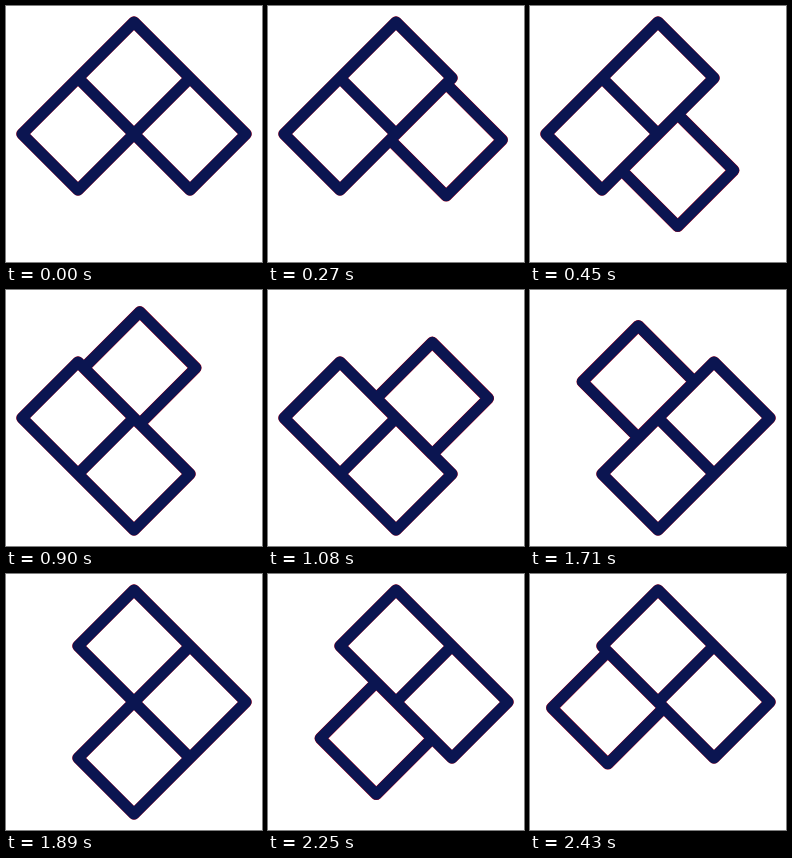
An HTML page that plays this animation: 256x256 px, repeating every 2520 ms.

```html
<!DOCTYPE html>
<html lang="en">
<head>
<meta charset="utf-8">
<title>Sliding squares</title>
<style>
  html, body { margin: 0; width: 100%; height: 100%; overflow: hidden; background: #fff; }
  svg { display: block; width: 100%; height: 100%; }
  path { fill: none; stroke-linejoin: round; }
  .rim { stroke: #c00018; stroke-width: 11.6; }
  .line { stroke: #0b1551; stroke-width: 11; }
</style>
</head>
<body>
<svg viewBox="0 0 256 256">
  <path class="rim"/>
  <path class="line"/>
</svg>
<script>
const STEP = 90, STEPS = 7, HOLD = 2, R = 56;
// Slot centres, clockwise from the top
const slots = [[128, 72], [184, 128], [128, 184], [72, 128]];
const paths = document.querySelectorAll('path');

const mod4 = n => (n + 4) % 4;
const ease = p => p * p * (3 - 2 * p);
const diamond = ([x, y]) => `M${x} ${y - R}l${R} ${R}l${-R} ${R}l${-R} ${-R}z`;

function draw(time) {
  const step = Math.floor(time / STEP) % (4 * STEPS);
  const turn = Math.floor(step / STEPS);
  const p = ease(Math.max(0, step % STEPS - HOLD) / (STEPS - HOLD));
  const from = mod4(1 - turn), to = mod4(2 - turn);
  const centres = slots.filter((_, i) => i !== from && i !== to);
  centres.push(slots[from].map((v, i) => v + (slots[to][i] - v) * p));
  const d = centres.map(diamond).join('');
  paths.forEach(path => path.setAttribute('d', d));
}

const start = performance.now();
function tick() {
  draw(performance.now() - start);
  requestAnimationFrame(tick);
}
tick();
</script>
</body>
</html>
```
